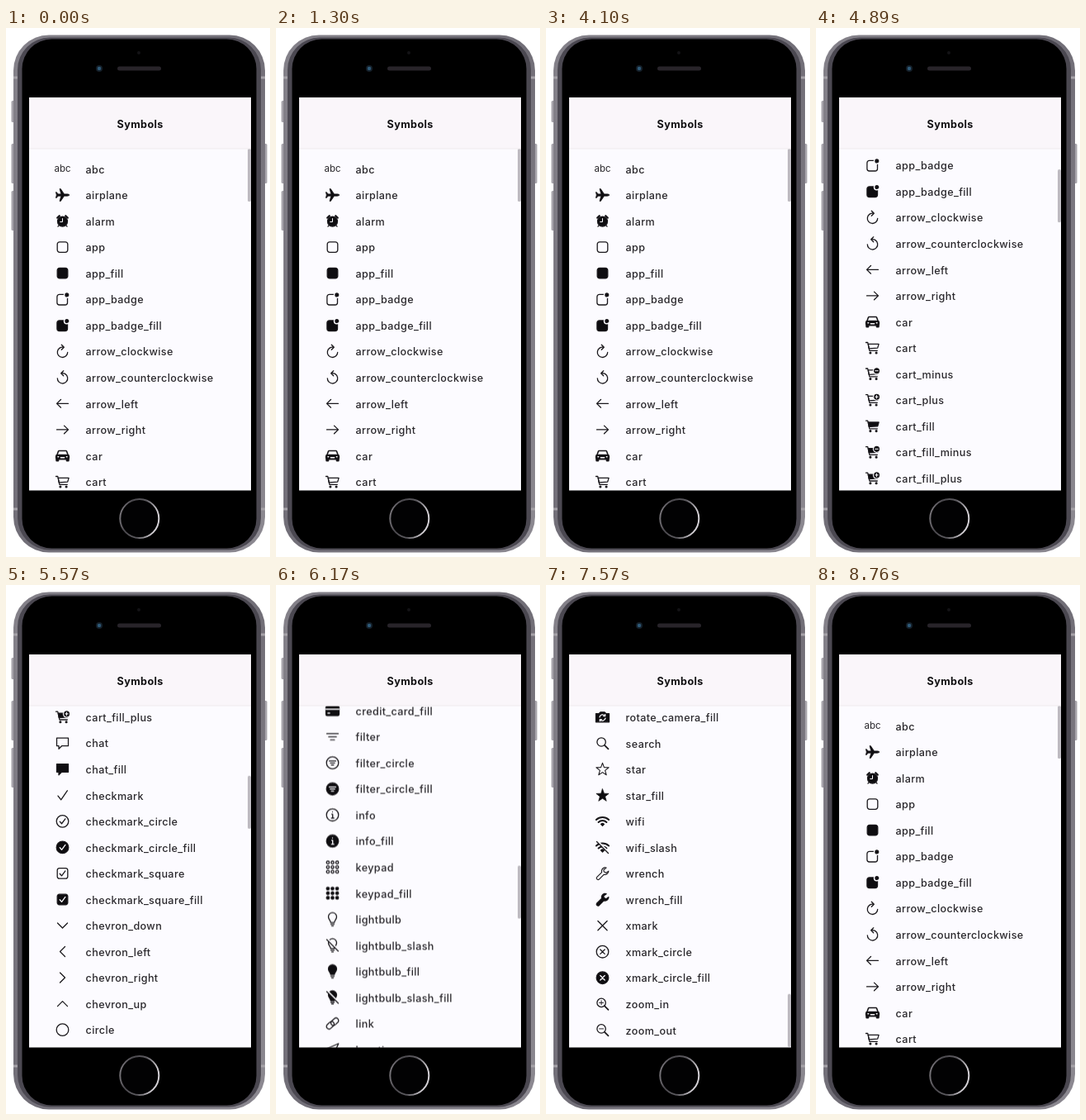
Animation, 320 px wide and 640 px high, one loop 8780 ms. Source, as an HTML page:

```html
<!DOCTYPE html>
<html lang="en">
<head>
<meta charset="utf-8">
<title>Symbols</title>
<style>
  html, body { margin: 0; width: 100%; height: 100%; overflow: hidden; background: #fff; }
  svg { display: block; width: 320px; height: 640px; }
  text { font-family: Inter, Roboto, sans-serif; fill: #2a282c; }
  .label { font-size: 12.6px; font-weight: 500; letter-spacing: .37px; }
  .title { font-size: 12.6px; font-weight: 700; letter-spacing: .4px; fill: #111012; }
  .abc { font-size: 11.5px; text-anchor: middle; }
  .icon { fill: none; stroke: #1a181c; stroke-width: 1.3; stroke-linecap: round; stroke-linejoin: round; }
  .icon .solid { fill: #0e0d10; }
  .icon .cut { stroke: #fcfbff; }
  .icon .hole { fill: #fcfbff; stroke: none; }
</style>
</head>
<body>
<svg viewBox="0 0 320 640">
  <defs>
    <linearGradient id="rim" x1="0" y1="0" x2="1" y2="1">
      <stop offset="0" stop-color="#85828a"/>
      <stop offset=".5" stop-color="#716e77"/>
      <stop offset="1" stop-color="#8d8a92"/>
    </linearGradient>
    <linearGradient id="homeRing" x1="0" y1="0" x2="1" y2=".25">
      <stop offset="0" stop-color="#8a878c"/>
      <stop offset=".3" stop-color="#4b494e"/>
      <stop offset=".65" stop-color="#5c5a5f"/>
      <stop offset="1" stop-color="#d2cfd4"/>
    </linearGradient>
    <clipPath id="view"><rect x="28" y="146" width="269" height="413.5"/></clipPath>
  </defs>

  <g fill="#a6a3aa">
    <rect x="6.5" y="88" width="5" height="26" rx="1.5"/>
    <rect x="6.5" y="140" width="5" height="48" rx="1.5"/>
    <rect x="6.5" y="197" width="5" height="48" rx="1.5"/>
    <rect x="311.5" y="140" width="5" height="48" rx="1.5"/>
  </g>
  <rect x="9" y="8.5" width="305" height="626" rx="43" fill="url(#rim)"/>
  <rect x="14" y="11.5" width="295" height="620" rx="39" fill="#4b4851"/>
  <rect x="19.5" y="13.5" width="284" height="616" rx="36" fill="#000"/>
  <path d="M9 60h5M309 60h5M9 582h5M309 582h5" stroke="#a5a2a8" stroke-width="3"/>
  <circle cx="161" cy="30" r="2" fill="#141316"/>
  <circle cx="113" cy="49" r="4" fill="#15202a"/>
  <circle cx="113" cy="49" r="2.2" fill="#2f5a78"/>
  <rect x="135" y="46.5" width="53" height="5" rx="2.5" fill="#28242a"/>
  <circle cx="161.8" cy="593.5" r="23.5" fill="#020203" stroke="url(#homeRing)" stroke-width="2"/>

  <rect x="28" y="84" width="269" height="475.5" fill="#fcfbff"/>
  <g clip-path="url(#view)">
    <g id="list"></g>
    <rect id="thumb" x="293" y="146" width="3.8" height="64" rx="1.6" fill="#bdbac0"/>
  </g>
  <rect x="28" y="84" width="269" height="62" fill="#faf6fa"/>
  <rect x="28" y="145.5" width="269" height="1" fill="#efebed"/>
  <text class="title" x="162.7" y="121" text-anchor="middle">Symbols</text>
</svg>

<script>
const path = (d, cls = '', width = '') =>
  `<path d="${d}" class="${cls}"${width && ` style="stroke-width:${width}"`}/>`;
const solid = d => path(d, 'solid');
const cut = (d, width) => path(d, 'cut', width);
const dot = (x, y, r, cls = '') => `<circle cx="${x}" cy="${y}" r="${r}" class="${cls}"/>`;
const box = (x, y, w, h, r, cls = '') =>
  `<rect x="${x}" y="${y}" width="${w}" height="${h}" rx="${r}" class="${cls}"/>`;
const turn = (angle, art) => `<g transform="rotate(${angle})">${art}</g>`;
const flip = art => `<g transform="scale(-1 1)">${art}</g>`;
const ring = d => dot(0, 0, 7.3) + path(d);
const disc = d => dot(0, 0, 7.3, 'solid') + cut(d);
const slash = art => art + cut('M-6.2-7.8L7.8 6.2', 2) + path('M-7-7L7 7');

const tick = 'M-3.3.3L-1 2.9L3.4-3';
const plus = 'M-3.5 0H3.5M0-3.5V3.5';
const minus = 'M-3.5 0H3.5';
const cross = 'M-2.7-2.7L2.7 2.7M2.7-2.7L-2.7 2.7';
const bars = 'M-4-2.3H4M-2.7.2H2.7M-1.4 2.7H1.4';
const hands = 'M0-4.3V.3H-3.2';
const info = 'M0-3.8V-3.6M-1-.9H.2V3.8M-1.3 3.8H1.7';
const needle = 'M3.5-3.5L1.3 1.3L-3.5 3.5L-1.3-1.3Z';
const bubble = 'M-7-6H7V3.5H-1L-4.5 7V3.5H-7Z';
const puff = 'M-5 5A3.3 3.3 0 0 1-5-1.6A4.6 4.6 0 0 1 3.6-2.6A3.8 3.8 0 0 1 4.5 5Z';
const bulb = 'M-2.2 4C-2.2 1.8-5-.2-5-3A5 5 0 0 1 5-3C5-.2 2.2 1.8 2.2 4Z';
const bulbBase = path('M-2 6H2M-1 7.9H1');
const compassArrow = 'M7.3-7.3L-7.3-.8L-.5.5L.8 7.3Z';
const bust = 'M-7 7C-7 3.5-4 2-0 2S7 3.5 7 7Z';
const play = 'M-4.5-6.5L6.5 0L-4.5 6.5Z';
const camera = 'M-8-4.3H-4.2L-2.6-6H2.6L4.2-4.3H8V6H-8Z';
const swap = 'M-3.5 0A3.6 3.6 0 0 1 3-1.4M3.5 1.4A3.6 3.6 0 0 1-3 2.8M3.2-3.3V-1.3H1.2M-3.2 4.7V2.7H-1.2';
const wrench = 'M2.2-7.2A4.6 4.6 0 0 0-.9-1.4L-7 4.6A1.9 1.9 0 0 0-4.4 7.2L1.6 1.2A4.6 4.6 0 0 0 7.4-3L4.4-.9L1.6-2.4L1.5-4.6L4.6-7A4.6 4.6 0 0 0 2.2-7.2Z';
const star = 'M' + Array.from({ length: 10 }, (_, i) => {
  const r = i % 2 ? 3.3 : 8, a = i * Math.PI / 5;
  return `${(r * Math.sin(a)).toFixed(2)} ${(.4 - r * Math.cos(a)).toFixed(2)}`;
}).join('L') + 'Z';

const reload = path('M6.2 1A6.2 6.2 0 1 1 1.5-5M-1.2-8L1.8-5L-1.2-2');
const arrow = path('M-7 0H7M2-4.8L7 0L2 4.8');
const chevron = path('M-3-6L3 0L-3 6');
const badge = dot(5, -5, 3.7, 'hole') + dot(5.3, -5.3, 1.9, 'solid');
const cart = cls => path('M-8-6.5H-5.8L-3.6 3.3H5.8') + path('M-5.2-4.6H7.6L6.2.2L-4.3.8Z', cls) +
  dot(-2.6, 6, .9, 'solid') + dot(4.6, 6, .9, 'solid');
const tag = mark => dot(5, -3.8, 4.6, 'hole') + dot(5, -3.8, 2.9, 'solid') +
  `<g transform="translate(5 -3.8) scale(.5)">${cut(mark, 2)}</g>`;
const keys = cls => [-5.6, 0, 5.6].map(x => [-5.6, 0, 5.6].map(y => dot(x, y, 1.7, cls)).join('')).join('');
const lens = d => dot(-1.4, -1.4, 5.2) + path('M2.5 2.5L7 7', '', 1.7) +
  `<g transform="translate(-1.4 -1.4) scale(.72)">${path(d)}</g>`;
const card = cls => box(-8, -5.5, 16, 11.5, 1.6, cls);
const lock = cls => path('M-3.4-1V-4A3.4 3.4 0 0 1 3.4-4V-1') + box(-5.2, -1, 10.4, 8, 1.4, cls);
const wifi = path('M-7.6-2A11 11 0 0 1 7.6-2M-4.9 1A7.2 7.2 0 0 1 4.9 1', '', 2) +
  solid('M0 5.4L-2 3.4A3 3 0 0 1 2 3.4Z');

const icons = {
  abc: '<text class="abc" y="3.7" stroke="none">abc</text>',
  airplane: path('M8 0C8-.8 6.8-1.1 5.5-1.1H2L-2.2-7.4H-3.4L-1.6-1.1H-5.4L-7.2-3.4H-8L-7.2 0L-8 3.4H-7.2L-5.4 1.1H-1.6L-3.4 7.4H-2.2L2 1.1H5.5C6.8 1.1 8 .8 8 0Z', 'solid', .9),
  alarm: dot(0, .5, 6, 'solid') + path('M-6.2-4L-3.8-6.2M6.2-4L3.8-6.2', '', 2.4) +
    path('M-4.5 5.4L-5.5 6.6M4.5 5.4L5.5 6.6') + cut('M0-3V1H-2.8', 1),
  app: box(-6.3, -6.3, 12.6, 12.6, 2.8),
  app_fill: box(-6.3, -6.3, 12.6, 12.6, 2.8, 'solid'),
  app_badge: box(-6.6, -5.8, 12.6, 12.6, 2.8) + badge,
  app_badge_fill: box(-6.6, -5.8, 12.6, 12.6, 2.8, 'solid') + badge,
  arrow_clockwise: reload,
  arrow_counterclockwise: flip(reload),
  arrow_left: flip(arrow),
  arrow_right: arrow,
  car: path('M-6.6-1L-5-5.4Q-4.7-6-4-6H4Q4.7-6 5-5.4L6.6-1', '', 1.6) + box(-8, -1, 16, 5.3, 1.8, 'solid') +
    box(-7.6, 3.5, 2.8, 3, .6, 'solid') + box(4.8, 3.5, 2.8, 3, .6, 'solid') +
    cut('M-5.6 1.3H-4.8M4.8 1.3H5.6M-2.2 2.3H2.2'),
  cart: cart(''),
  cart_minus: cart('') + tag(minus),
  cart_plus: cart('') + tag(plus),
  cart_fill: cart('solid'),
  cart_fill_minus: cart('solid') + tag(minus),
  cart_fill_plus: cart('solid') + tag(plus),
  chat: path(bubble),
  chat_fill: solid(bubble),
  checkmark: path('M-5.5.8L-1.8 5.5L5.8-5.5'),
  checkmark_circle: ring(tick),
  checkmark_circle_fill: disc(tick),
  checkmark_square: box(-6.3, -6.3, 12.6, 12.6, 2.4) + path(tick),
  checkmark_square_fill: box(-6.3, -6.3, 12.6, 12.6, 2.4, 'solid') + cut(tick),
  chevron_down: turn(90, chevron),
  chevron_left: flip(chevron),
  chevron_right: chevron,
  chevron_up: turn(-90, chevron),
  circle: dot(0, 0, 7.3),
  circle_fill: dot(0, 0, 7.3, 'solid'),
  clock: ring(hands),
  clock_fill: disc(hands),
  cloud: path(puff),
  cloud_fill: solid(puff),
  compass: ring(needle),
  compass_fill: disc(needle),
  copy: box(-6.5, -7, 9, 10.5, 1.5) + path('M-2.5 7H5Q6.5 7 6.5 5.5V-3.5'),
  credit_card: card('') + path('M-8-2H8M-5.5 3H-3'),
  credit_card_fill: card('solid') + cut('M-8-1.7H8M-5.5 3H-3.5', 1.5),
  filter: path('M-7-3.8H7M-4.7 0H4.7M-2.4 3.8H2.4'),
  filter_circle: ring(bars),
  filter_circle_fill: disc(bars),
  info: ring(info),
  info_fill: disc(info),
  keypad: keys(''),
  keypad_fill: keys('solid'),
  lightbulb: path(bulb) + bulbBase,
  lightbulb_slash: slash(path(bulb) + bulbBase),
  lightbulb_fill: solid(bulb) + bulbBase,
  lightbulb_slash_fill: slash(solid(bulb) + bulbBase),
  link: turn(-42, box(-8.6, -3.3, 10.4, 6.2, 3.1) + box(-1.8, -2.9, 10.4, 6.2, 3.1)),
  location: path(compassArrow),
  location_fill: solid(compassArrow),
  location_slash: slash(path(compassArrow)),
  location_slash_fill: slash(solid(compassArrow)),
  lock: lock(''),
  lock_fill: lock('solid'),
  minus: path('M-6.5 0H6.5'),
  minus_circle: ring(minus),
  minus_circle_fill: disc(minus),
  pause: box(-5, -6, 3, 12, 1) + box(2, -6, 3, 12, 1),
  pause_fill: box(-5, -6, 3, 12, 1, 'solid') + box(2, -6, 3, 12, 1, 'solid'),
  person: dot(0, -3.6, 3.5) + path(bust),
  person_fill: dot(0, -3.6, 3.5, 'solid') + solid(bust),
  play: path(play),
  play_fill: solid(play),
  plus: path('M-6.5 0H6.5M0-6.5V6.5'),
  plus_circle: ring(plus),
  plus_circle_fill: disc(plus),
  rotate_camera: path(camera) + path(swap),
  rotate_camera_fill: solid(camera) + cut(swap),
  search: lens(''),
  star: path(star, '', 1.1),
  star_fill: path(star, 'solid', .8),
  wifi,
  wifi_slash: slash(wifi),
  wrench: path(wrench, '', 1.1),
  wrench_fill: solid(wrench),
  xmark: path('M-5.6-5.6L5.6 5.6M5.6-5.6L-5.6 5.6'),
  xmark_circle: ring(cross),
  xmark_circle_fill: disc(cross),
  zoom_in: lens(plus),
  zoom_out: lens(minus)
};

const firstRow = 171, pitch = 31.54, thumbRatio = .155;
const list = document.getElementById('list');
const thumb = document.getElementById('thumb');

list.innerHTML = Object.entries(icons).map(([name, art], i) =>
  `<g transform="translate(0 ${(firstRow + i * pitch).toFixed(2)})">
    <g class="icon" transform="translate(68.5 -.5)">${art}</g>
    <text class="label" x="96.6" y="4.7">${name}</text>
  </g>`).join('');

// time in ms, scroll distance, easing towards the next step
const loop = 8780;
const steps = [
  [0, 0, 'linear'],
  [4560, 0, 'ease-in-out'],
  [4880, 162, 'linear'],
  [4990, 162, 'cubic-bezier(.35,0,.7,.7)'],
  [6170, 1247.6, 'cubic-bezier(.3,.35,.6,1)'],
  [7420, 2250, 'linear'],
  [7760, 2250, 'ease-in-out'],
  [8700, 0, 'linear'],
  [loop, 0, 'linear']
];

function scroll(element, ratio) {
  element.animate(steps.map(([time, distance, easing]) => ({
    offset: time / loop,
    transform: `translateY(${distance * ratio}px)`,
    easing
  })), { duration: loop, iterations: Infinity });
}
scroll(list, -1);
scroll(thumb, thumbRatio);
</script>
</body>
</html>
```
